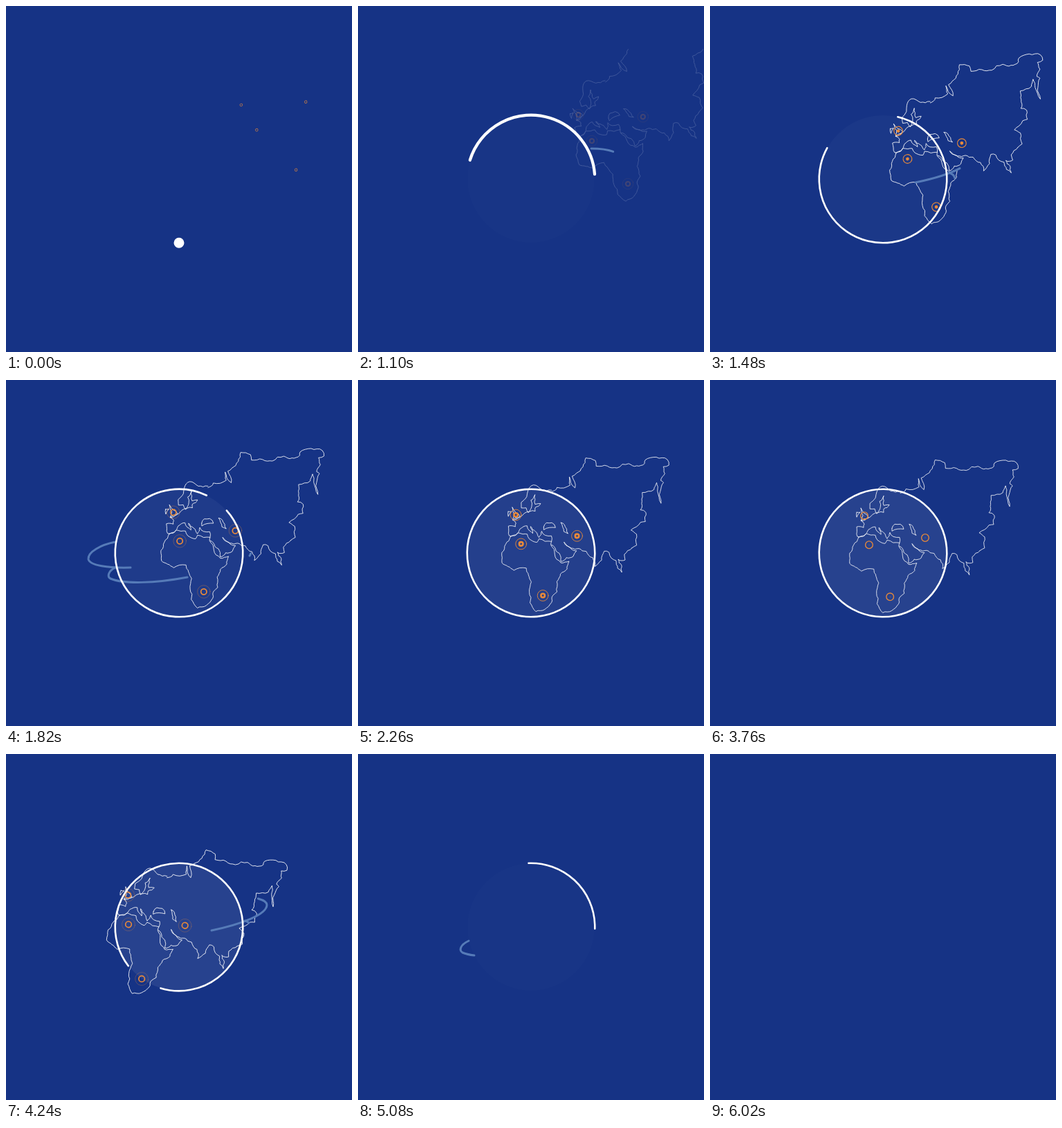
An HTML page for the animation above (6.04 s loop, 500 by 500 pixels).

```html
<!DOCTYPE html>
<html lang="en">
<head>
<meta charset="utf-8">
<title>Globe</title>
<style>
  html, body { margin: 0; width: 100%; height: 100%; overflow: hidden; background: #163385; }
  svg { display: block; width: 100vw; height: 100vh; fill: none; stroke-linecap: round; stroke-linejoin: round; }
</style>
</head>
<body>
<svg viewBox="0 0 500 500">
  <defs><clipPath id="window"><rect y="62" width="500" height="438"/></clipPath></defs>
  <circle id="disc" cx="250" cy="250" r="92" fill="#fff"/>
  <g clip-path="url(#window)">
    <g id="world">
      <g id="coast" stroke="#fff" stroke-width=".8"></g>
      <g id="pins" stroke="#e8893a"></g>
    </g>
  </g>
  <g id="trails" stroke="#567bb8" stroke-width="3"></g>
  <circle id="ring" cx="250" cy="250" r="92.3" pathLength="360" stroke="#fff"/>
</svg>
<script>
const LOOP = 6040;
const byId = id => document.getElementById(id);
const clamp = v => Math.max(0, Math.min(1, v));
const ramp = (t, from, to) => clamp((t - from) / (to - from));

// Slow-in, slow-out progress; a and b are the x handles of a cubic Bezier with y handles 0 and 1.
function ease(t, from, to, a = .6, b = .35) {
  const x = ramp(t, from, to);
  let low = 0, high = 1;
  for (let i = 0; i < 20; i++) {
    const s = (low + high) / 2, w = 1 - s;
    if (3 * s * w * w * a + 3 * s * s * w * b + s ** 3 < x) low = s;
    else high = s;
  }
  return low * low * (3 - 2 * low);
}
const smooth = (t, from, to) => ease(t, from, to, 1 / 3, 2 / 3);

function set(el, attrs) {
  for (const key in attrs) el.setAttribute(key, attrs[key]);
}
function add(parent, tag, attrs) {
  const el = document.createElementNS('http://www.w3.org/2000/svg', tag);
  set(el, attrs);
  return byId(parent).appendChild(el);
}

let seed = 7;
const random = () => (seed = seed * 16807 % 2147483647) / 2147483647;

// Splits long edges at displaced midpoints, which turns a rough outline into a coast.
function roughen([x0, y0], [x1, y1]) {
  const dx = x1 - x0, dy = y1 - y0;
  if (Math.hypot(dx, dy) < 5) return `L${x1} ${y1}`;
  const k = (random() - .5) * .3;
  const mid = [(x0 + x1) / 2 - dy * k, (y0 + y1) / 2 + dx * k];
  return roughen([x0, y0], mid) + roughen(mid, [x1, y1]);
}
function addCoast(outline) {
  const points = outline.split(' ').map(p => p.split(',').map(Number));
  const d = points.slice(1).map((p, i) => roughen(points[i], p)).join('');
  add('coast', 'path', { d: `M${points[0]}${d}` });
}

// Africa
addCoast('216,227 240,224 243,231 254,236 257,231 275,235 274,240 288,266 300,264 297,275 282,293 282,308 276,313 274,323 264,333 251,336 242,308 245,293 238,273 220,276 203,265 203,250 216,227');
// Arabia and southern Asia
addCoast('275,240 279,243 288,264 306,257 311,249 302,244 293,236 303,245 325,250 337,272 351,250 358,252 361,260 368,264 370,275 376,281 371,262 381,263 380,255 391,246');
// Pacific and Arctic coasts
addCoast('391,246 398,242 398,226 390,220 404,209 411,208 412,195 404,191 407,166 424,162 428,152 429,164 434,182 433,165 438,152 434,149 440,139 438,129 446,127 444,119 412,119 411,124 388,124 371,130 357,127 341,127 340,119 326,115 312,137 306,141 310,158 302,142 303,154 284,157 276,163');
// Europe
addCoast('276,161 250,153 242,161 240,170 232,178 232,186 239,186 242,193 247,184 246,175 252,167 252,181 260,180 252,186 252,191 236,194 219,203 224,208 223,213 213,212 214,226 224,225 230,216 240,212 248,223 245,213 257,229 261,220 266,226 275,227 275,235');
// Inland seas and islands
addCoast('264,214 268,208 276,208 281,215 264,218 264,214');
addCoast('289,208 294,211 299,224 293,221 289,208');
addCoast('219,185 230,198 219,203 222,195 219,185');
addCoast('213,191 218,191 213,198 213,191');

const pins = [[224, 196], [231, 238], [312, 227.5], [261.5, 313]].map(([cx, cy]) =>
  [0, 1, 2].map(() => add('pins', 'circle', { cx, cy })));

// Each trail runs once while the globe opens and once while it closes.
const TRAIL_TIME = 300;
const trails = [
  { starts: [1030, 3880], d: 'M337 206C360 206 377 211 377 218C377 232 340 246 297 255' },
  { starts: [1280, 4130], d: 'M345 241C353 243 356 249 352 254' },
  { starts: [1520, 4460], d: 'M158 234C138 238 118 248 119 259C121 268 148 272 180 271' },
  { starts: [1520, 4990], d: 'M160 270C147 276 146 284 151 287C170 295 215 294 262 285' }
];
for (const trail of trails) trail.el = add('trails', 'path', { d: trail.d, pathLength: 1 });

function drawPins(t, alpha) {
  for (const [first, ...rings] of pins) {
    set(first, {
      r: 1.8 + 6 * ramp(t, 0, 800),
      'stroke-width': .9,
      opacity: .7 * (1 - ramp(t, 0, 1250))
    });
    rings.forEach((ring, i) => {
      const age = (t + 460 + i * 600) % 1200;
      const phase = age / 1200;
      set(ring, {
        r: 10.3 * phase,
        'stroke-width': Math.min(20 * phase, .7 / phase),
        opacity: t - age < 740 ? 0 : alpha * clamp(4.2 * (1 - phase))
      });
    });
  }
}

function drawTrails(t) {
  for (const { el, starts } of trails) {
    const start = t < 3000 ? starts[0] : starts[1];
    const head = ramp(t, start, start + TRAIL_TIME);
    const tail = ramp(t, start + TRAIL_TIME, start + 2 * TRAIL_TIME);
    set(el, {
      visibility: head > tail ? 'visible' : 'hidden',
      'stroke-dasharray': `${head - tail} 3`,
      'stroke-dashoffset': -tail
    });
  }
}

// Angles run clockwise from the bottom of the globe.
function drawRing(t) {
  const opening = t < 3000;
  const grown = ease(t, 0, 2400);
  const tail = opening ? 243.6 * grown : 720 * ease(t, 3680, 6060);
  const head = opening ? 603.6 * grown : 360 + 360 * ease(t, 3830, 5940);
  const thick = 1 - smooth(t, 100, 1400) + smooth(t, 5100, 5950);
  set(byId('ring'), {
    visibility: t < 6010 ? 'visible' : 'hidden',
    'stroke-width': 2.6 + 12.4 * thick,
    'stroke-dasharray': `${Math.max(.01, head - tail)} 720`,
    transform: `rotate(${90 + tail} 250 250)`
  });
}

function draw(t) {
  const spin = 22.4 * (ease(t, 20, 2840, .72, .25) - 1) + 36 * smooth(t, 3690, 5440);
  const alpha = ramp(t, 1030, 1400) - ramp(t, 4450, 4970);
  set(byId('world'), { transform: `rotate(${spin} 148 -123)` });
  set(byId('coast'), { opacity: alpha });
  set(byId('disc'), { opacity: .075 * (ramp(t, 950, 2600) - ramp(t, 4250, 5200)) });
  drawPins(t, alpha);
  drawTrails(t);
  drawRing(t);
}

const start = performance.now();
function tick() {
  draw((performance.now() - start) % LOOP);
  requestAnimationFrame(tick);
}
tick();
</script>
</body>
</html>
```
